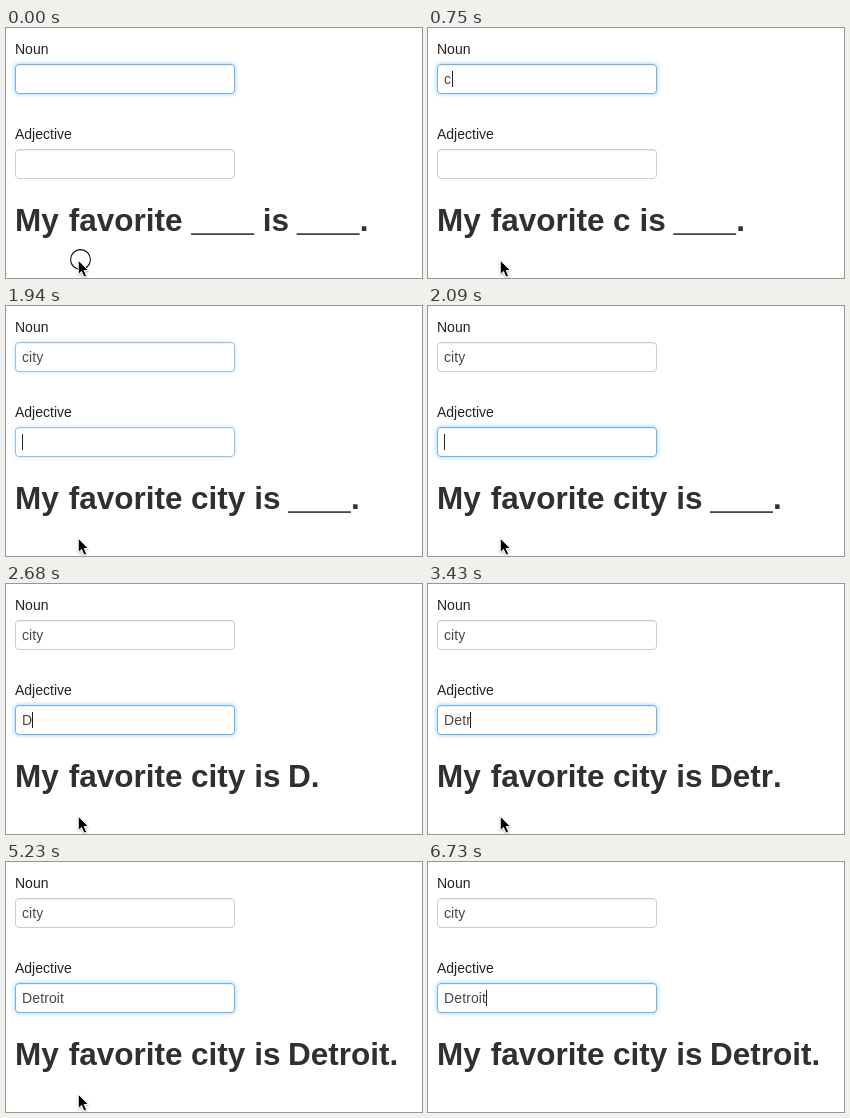
An HTML page that plays this animation: 416 px wide and 250 px high, repeating every 6830 ms.

```html
<!DOCTYPE html>
<html lang="en">
<head>
<meta charset="utf-8">
<title>Fill in the blanks</title>
<style>
  html, body { margin: 0; width: 100%; height: 100%; overflow: hidden; background: #fff; }
  svg { display: block; width: 416px; height: 250px; }
  text { font: 14px "Liberation Sans", Arial, sans-serif; fill: #222; }
  .value { fill: #484848; letter-spacing: .12px; }
  .head text { font-size: 31.5px; font-weight: bold; fill: #303030; }
  .head rect { fill: #303030; }
</style>
</head>
<body>
<svg viewBox="0 0 416 250">
  <defs>
    <filter id="soft" x="-10%" y="-60%" width="120%" height="220%">
      <feGaussianBlur stdDeviation="2.4"/>
    </filter>
    <filter id="shade" x="-50%" y="-50%" width="200%" height="200%">
      <feDropShadow dx="0" dy="1" stdDeviation=".8" flood-opacity=".3"/>
    </filter>
  </defs>
  <g id="form"></g>
  <g class="head" id="head"></g>
  <circle id="click" cx="74.5" cy="231.5" r="9.9" fill="none" stroke="#111" stroke-width="1.1"/>
  <path id="pointer" d="M72.3 232.3V246.4L75.5 243.4L78 249L80.6 247.9L78.2 242.5H82.4Z"
        fill="#000" stroke="#fff" stroke-width=".9" filter="url(#shade)"/>
</svg>
<script>
const LOOP = 6830, LEFT = 9, BASE = 203, EM = 31.5;
const SPACE = EM * .278, BLANK = EM * 2;
const $ = id => document.getElementById(id);

function add(parent, tag, attrs, content = '') {
  const el = document.createElementNS('http://www.w3.org/2000/svg', tag);
  for (const key in attrs) el.setAttribute(key, attrs[key]);
  el.textContent = content;
  parent.append(el);
  return el;
}

function show(el, on) {
  el.setAttribute('visibility', on ? 'visible' : 'hidden');
}

function makeField(label, top) {
  const form = $('form');
  const box = { x: LEFT, y: top, width: 220, height: 30, rx: 4 };
  add(form, 'text', { x: LEFT, y: top - 10 }, label);
  const glow = add(form, 'rect', { ...box, fill: '#52a8ec', filter: 'url(#soft)' });
  const frame = add(form, 'rect', { x: LEFT + .5, y: top + .5, width: 219, height: 29, rx: 3.5, fill: '#fff' });
  add(form, 'path', { d: `M12 ${top + 1.5}H226`, stroke: '#000', 'stroke-opacity': .06 });
  const value = add(form, 'text', { x: 16, y: top + 20, class: 'value' });
  const caret = add(form, 'rect', { y: top + 7, width: 1, height: 16, fill: '#222' });

  return (text, focus, caretX) => {
    const mix = (a, b) => Math.round(a + (b - a) * focus);
    glow.setAttribute('opacity', .6 * focus);
    frame.setAttribute('stroke', `rgb(${mix(204, 108)},${mix(204, 180)},${mix(204, 240)})`);
    value.textContent = text;
    show(caret, caretX);
    caret.setAttribute('x', caretX);
  };
}

const setNoun = makeField('Noun', 36);
const setAdjective = makeField('Adjective', 121);

const head = $('head');
const word = (text, x) => add(head, 'text', { x, y: BASE }, text);
const blank = () => add(head, 'rect', { y: BASE + 2.3, width: BLANK, height: 1.6 });
word('My', LEFT);
word('favorite', 62.7);
const noun = word('', 185.1), is = word('is', 0), adjective = word('', 0), stop = word('.', 0);
const nounBlank = blank(), adjectiveBlank = blank();

// Places a word or its blank and returns where it ends.
function fill(el, line, text, x) {
  el.textContent = text;
  el.setAttribute('x', x);
  line.setAttribute('x', x);
  show(line, !text);
  return x + (text ? el.getComputedTextLength() : BLANK);
}

function setHeading(a, b) {
  const isX = fill(noun, nounBlank, a, 185.1) + SPACE;
  is.setAttribute('x', isX);
  const end = fill(adjective, adjectiveBlank, b, isX + EM * .795 + SPACE);
  stop.setAttribute('x', end);
}

// start, noun, adjective, focus moved to second field, caret x (0 = hidden)
const steps = [
  [0, '', '', 0, 0],
  [450, '', '', 0, 16],
  [750, 'c', '', 0, 24],
  [900, 'ci', '', 0, 26],
  [1350, 'cit', '', 0, 31],
  [1490, 'city', '', 0, 38],
  [1940, 'city', '', .5, 16],
  [2090, 'city', '', 1, 16],
  [2540, 'city', '', 1, 0],
  [2680, 'city', 'D', 1, 26],
  [2980, 'city', 'De', 1, 33],
  [3130, 'city', 'Det', 1, 38],
  [3430, 'city', 'Detr', 1, 42],
  [3580, 'city', 'Detroi', 1, 53],
  [3730, 'city', 'Detroit', 1, 58]
];
[4180, 4780, 5230, 5680, 6280, 6730].forEach((t, i) =>
  steps.push([t, 'city', 'Detroit', 1, i % 2 ? 58 : 0]));

let current;
function draw(t) {
  show($('click'), t < 150);
  show($('pointer'), t < 5830);
  const step = steps.findLast(s => s[0] <= t);
  if (step === current) return;
  current = step;
  const [, a, b, moved, caretX] = step;
  setNoun(a, 1 - moved, moved ? 0 : caretX);
  setAdjective(b, moved, moved ? caretX : 0);
  setHeading(a, b);
}

const start = performance.now();
function tick() {
  draw((performance.now() - start) % LOOP);
  requestAnimationFrame(tick);
}
tick();
</script>
</body>
</html>
```
